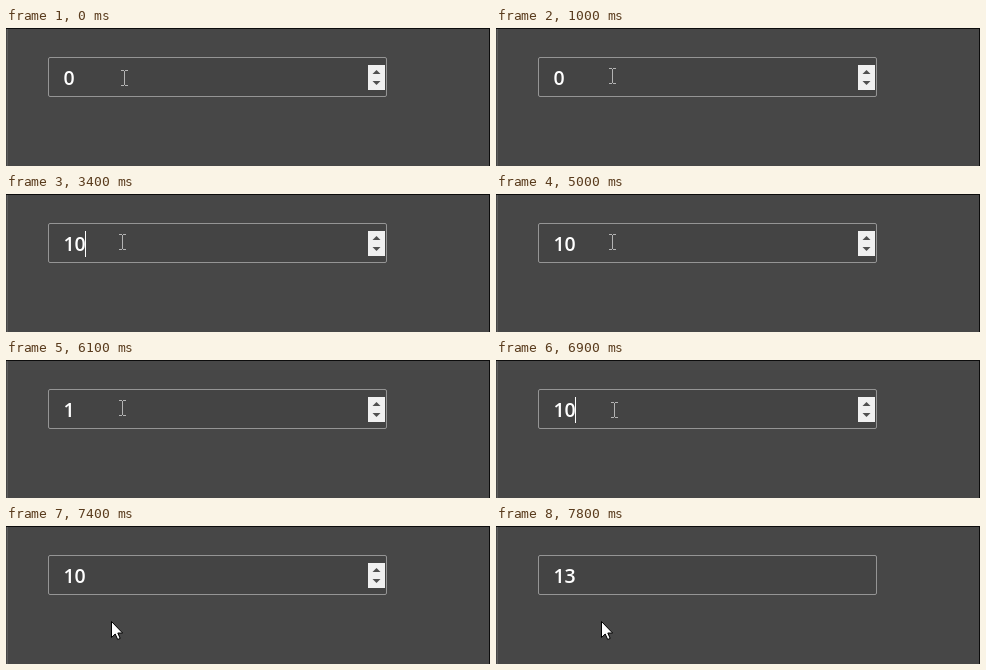
These frames come from a looping animation (484 px wide and 138 px high, 8 s). An HTML page:

```html
<!DOCTYPE html>
<html lang="en">
<head>
<meta charset="utf-8">
<title>Number input</title>
<style>
  html, body { margin: 0; width: 100%; height: 100%; overflow: hidden; background: #474747; }
  svg { display: block; width: 484px; height: 138px; }
  text { font: 600 19.5px "Open Sans", "Noto Sans", sans-serif; fill: #fff; }

  .anim { animation: 8s step-end infinite; }
  .zero { animation-name: zero; }
  .one { animation-name: one; }
  .unit { animation-name: unit; }
  .three { animation-name: three; }
  .spinner { animation-name: spinner; }
  .caret { animation-name: blink, advance; }
  .beam { animation-name: beam, beam-path; }
  .arrow { animation-name: arrow, arrow-path; }

  /* Value: 0, 1, 10, 1, 10, then 13 when the field loses focus */
  @keyframes zero { 0% { opacity: 1 } 22.5%, 100% { opacity: 0 } }
  @keyframes one { 0% { opacity: 0 } 22.5%, 100% { opacity: 1 } }
  @keyframes unit {
    0%, 70%, 96.25%, 100% { opacity: 0 }
    30%, 85% { opacity: 1 }
  }
  @keyframes three { 0% { opacity: 0 } 96.25%, 100% { opacity: 1 } }
  @keyframes spinner { 0% { opacity: 1 } 96.25%, 100% { opacity: 0 } }

  @keyframes blink {
    0%, 12.5%, 36.25%, 50%, 62.5%, 76.25%, 91.25%, 100% { opacity: 0 }
    5%, 18.75%, 42.5%, 56.25%, 70%, 82.5% { opacity: 1 }
  }
  @keyframes advance {
    0%, 70% { transform: translate(68px, 37px) }
    30%, 85%, 100% { transform: translate(79px, 37px) }
  }

  /* Mouse: text beam inside the field, arrow outside it */
  @keyframes beam { 0% { opacity: 1 } 87.5%, 100% { opacity: 0 } }
  @keyframes beam-path {
    0% { transform: translate(118px, 50px) }
    1.25% { transform: translate(116px, 48px) }
    86.25%, 100% { transform: translate(118px, 50px) }
  }
  @keyframes arrow { 0% { opacity: 0 } 87.5%, 100% { opacity: 1 } }
  @keyframes arrow-path {
    0%, 87.5% { transform: translate(120px, 75px) }
    88.75% { transform: translate(121px, 89px) }
    90% { transform: translate(115px, 92px) }
    91.25% { transform: translate(108px, 95px) }
    92.5%, 100% { transform: translate(105px, 95px) }
  }
</style>
</head>
<body>
<svg viewBox="0 0 484 138">
  <rect width="484" height="138" fill="#474747"/>
  <path d="M1.5 1V138" stroke="#5c5c5c"/>
  <path d="M0 .5H484M483.5 0V138" stroke="#0c0c0c"/>

  <rect x="42.5" y="29.5" width="338" height="39" rx="1.5" fill="#444" stroke="#959595"/>

  <text class="anim zero" x="57.6" y="57">0</text>
  <text class="anim one" x="57.6" y="57">1</text>
  <text class="anim unit" x="68.6" y="57">0</text>
  <text class="anim three" x="68.6" y="57">3</text>
  <rect class="anim caret" width="1" height="26" fill="#fff"/>

  <g class="anim spinner">
    <rect x="362" y="37" width="17" height="25" fill="#f0f0f0"/>
    <path d="M366.5 46L370.5 42L374.5 46ZM366.5 53L370.5 57L374.5 53Z" fill="#505050"/>
  </g>

  <path class="anim beam" d="M-3 -7.5H0M1 -7.5H4M.5 -7V7M-3 7.5H0M1 7.5H4" fill="none" stroke="#b4b4b4"/>
  <path class="anim arrow" d="M.5 .5V16.5L4.2 13L6.7 18.5L9.2 17.4L6.8 12H11.6Z" fill="#fff" stroke="#000"/>
</svg>
</body>
</html>
```
